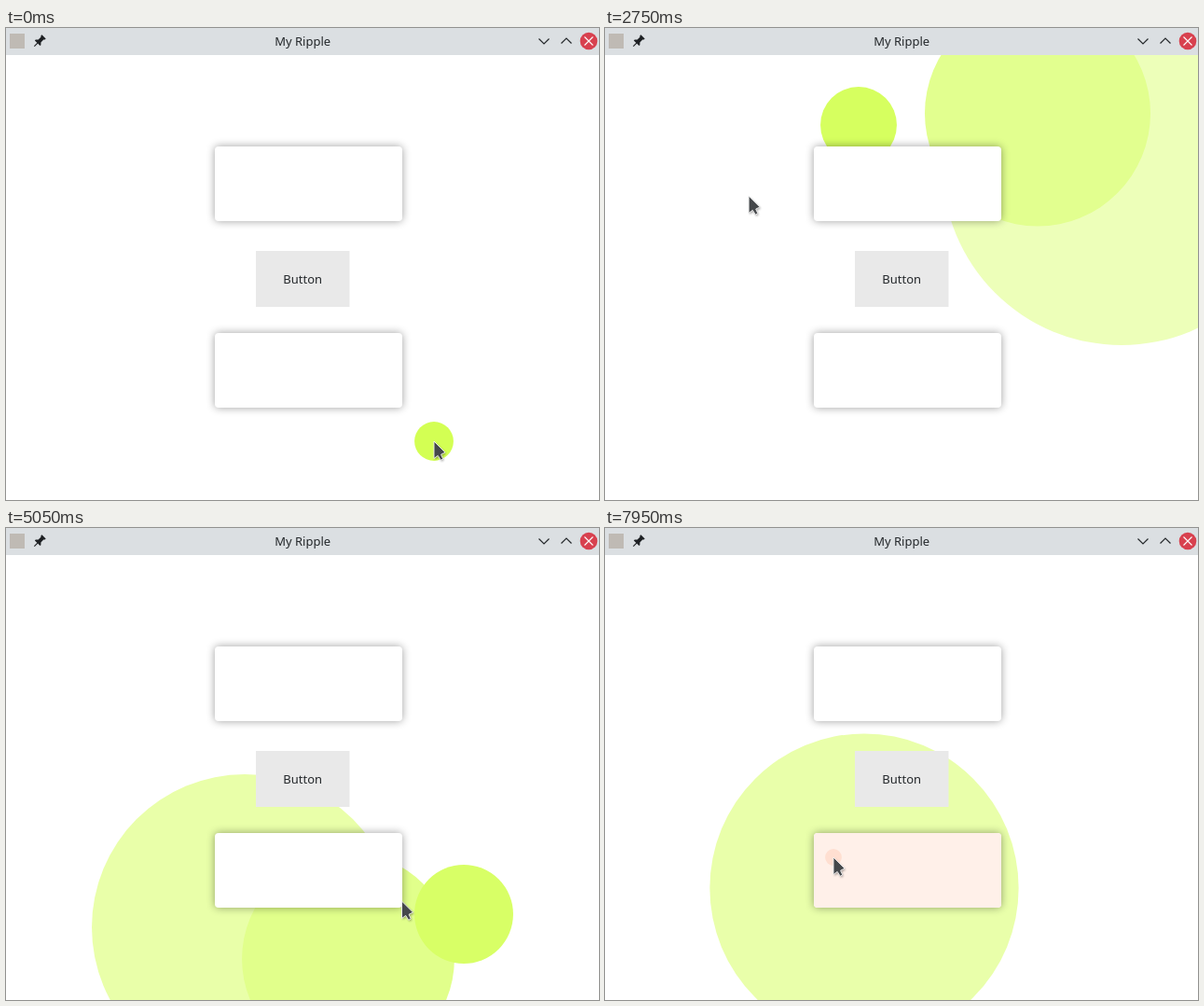
These frames come from a looping animation (636x506 px, 8000 ms). An HTML page:

```html
<!DOCTYPE html>
<html lang="en">
<head>
<meta charset="utf-8">
<title>My Ripple</title>
<style>
  html, body { margin: 0; width: 100%; height: 100%; overflow: hidden; background: #fff; }
  svg { display: block; width: 100%; height: 100%; }
  text { font: 13px "Noto Sans", sans-serif; text-anchor: middle; fill: #24282b; }
</style>
</head>
<body>
<svg viewBox="0 0 636 506">
  <defs>
    <filter id="blur" x="-20%" y="-30%" width="140%" height="160%">
      <feGaussianBlur stdDeviation="4.6"/>
    </filter>
    <filter id="soft" x="-60%" y="-40%" width="220%" height="180%">
      <feGaussianBlur stdDeviation="1"/>
    </filter>
    <rect id="card" x="224" width="201" height="80" rx="4"/>
    <path id="arrow" d="M0 0V18.5L4.2 15.4L7.3 20.3L9.7 18.8L7.6 14.2L12 12Z"/>
    <clipPath id="inCard"><use href="#card" y="327"/></clipPath>
  </defs>

  <rect width="636" height="506" fill="#fff"/>
  <g id="waves"/>

  <use href="#card" y="127" opacity=".38" filter="url(#blur)"/>
  <use href="#card" y="127" fill="#fff"/>
  <rect x="268" y="239" width="100.5" height="60" fill="#e9e9e9"/>
  <text x="318.2" y="274">Button</text>
  <use href="#card" y="327" opacity=".38" filter="url(#blur)"/>
  <use href="#card" y="327" fill="#fff"/>
  <g id="cardWaves" clip-path="url(#inCard)"/>

  <rect width="636" height="29" fill="#dbdfe2"/>
  <rect x="4" y="6" width="16" height="16" fill="#bfbab4"/>
  <g transform="translate(36 14) rotate(45)" fill="#1d2023">
    <path d="M-3-6.5H3V-5L2-4V0L4 2V3.2H-4V2L-2 0V-4L-3-5Z"/>
    <path d="M-.6 3H.6V8H-.6Z"/>
  </g>
  <text x="318.2" y="19">My Ripple</text>
  <g fill="none" stroke="#24282b" stroke-width="1.2">
    <path d="M571.5 11.5L577 17L582.5 11.5"/>
    <path d="M595.5 16.5L601 11L606.5 16.5"/>
  </g>
  <circle cx="625" cy="14" r="9.3" fill="#d8414f"/>
  <path d="M620.5 9.5L629.5 18.5M629.5 9.5L620.5 18.5" stroke="#fff" stroke-width="1.1"/>

  <g id="cursor">
    <use href="#arrow" x="1" y="1.5" opacity=".35" filter="url(#soft)"/>
    <use href="#arrow" fill="#45484b" stroke="#f4f4f4" stroke-width=".9"/>
  </g>
</svg>
<script>
const LOOP = 8000, STEP = 50;
const SPEED = 0.182, MAX_R = 200, FADE = 0.65;
const REST = 115, TRAVEL = 400;
const LIME = [208, 255, 70], PEACH = [255, 222, 208];

// Where the pointer presses: time, x, y
const presses = [
  [-115, 459, 443], [505, 564, 377], [955, 601, 257], [1330, 592, 201],
  [1695, 554, 148], [2085, 464, 91.5], [2525, 272, 104], [2850, 154, 180],
  [3194, 141, 319], [3545, 159, 397], [3853, 191, 417.5], [4149, 256, 428],
  [4424, 367, 462], [4759, 491, 414], [6145, 329, 380], [7040, 278, 386],
  [7901, 245, 353]
];

const $ = id => document.getElementById(id);
const mix = (a, b, k) => a + (b - a) * k;
const clamp = v => Math.min(1, Math.max(0, v));
const smooth = u => u * u * (3 - 2 * u);
const onCard = (x, y) => x >= 224 && x <= 425 && y >= 327 && y <= 407;

function addWave(layer, color, start, x, y) {
  const node = document.createElementNS("http://www.w3.org/2000/svg", "circle");
  node.setAttribute("cx", x);
  node.setAttribute("cy", y);
  $(layer).append(node);
  return { node, color, start };
}

const waves = presses.flatMap(([start, x, y]) => {
  const lime = addWave("waves", LIME, start, x, y);
  return onCard(x, y) ? [lime, addWave("cardWaves", PEACH, start, x, y)] : [lime];
});

// Rest after a press, glide on, rest again before the next one
function pointerAt(t) {
  const i = presses.findLastIndex(p => p[0] <= t);
  const [t0, x0, y0] = presses[i];
  const [t1, x1, y1] = presses[i + 1] || [LOOP, x0, y0];
  const rest = Math.min(REST, (t1 - t0) * 0.3);
  const travel = Math.min(TRAVEL, t1 - t0 - 2 * rest);
  const k = smooth(clamp((t - t0 - rest) / travel));
  return [mix(x0, x1, k), mix(y0, y1, k)];
}

// Waves are opaque; their colour pales as they grow
function draw(t) {
  for (const { node, color, start } of waves) {
    const r = (t - start) * SPEED;
    const live = r > 0 && r <= MAX_R;
    node.setAttribute("r", live ? r : 0);
    if (live) node.setAttribute("fill", `rgb(${color.map(c => Math.round(mix(c, 255, FADE * r / MAX_R)))})`);
  }
  $("cursor").setAttribute("transform", `translate(${pointerAt(t)})`);
}

const begin = performance.now();
function tick() {
  const t = (performance.now() - begin) % LOOP;
  draw(Math.floor(t / STEP) * STEP);
  requestAnimationFrame(tick);
}
tick();
</script>
</body>
</html>
```
